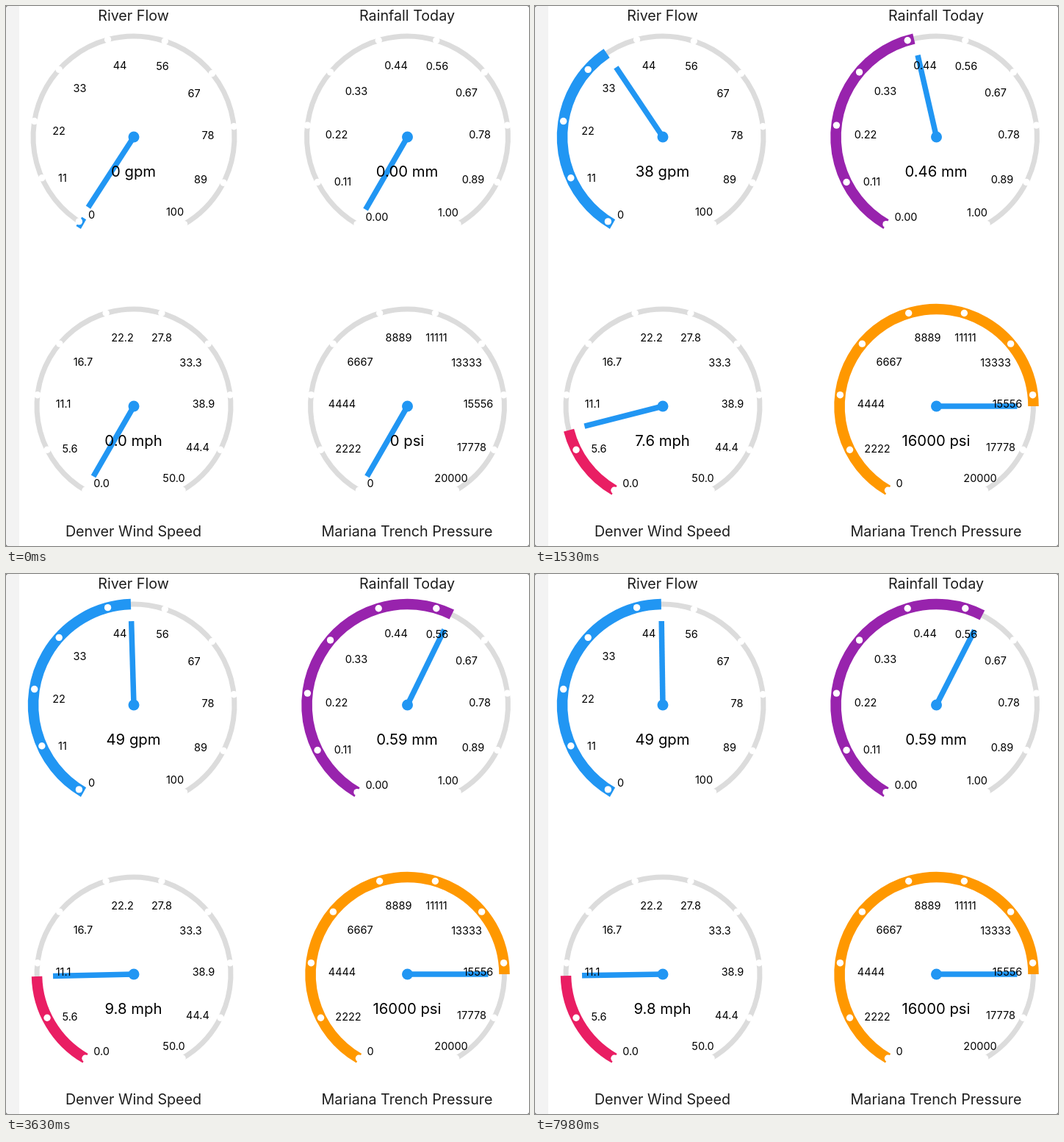
An HTML page with a canvas that plays this animation: 712x734 px, repeating every 8 s.

```html
<!DOCTYPE html>
<html lang="en">
<head>
<meta charset="utf-8">
<title>Gauges</title>
<style>
html, body { margin: 0; width: 100%; height: 100%; overflow: hidden; background: #666; }
canvas { display: block; width: 712px; height: 734px; border-radius: 3px; }
</style>
</head>
<body>
<canvas id="stage"></canvas>
<script>
const W = 712, H = 734, LOOP = 8000;
const BLUE = '#2196f3';
const canvas = document.getElementById('stage');
const ctx = canvas.getContext('2d');
const dpr = window.devicePixelRatio || 1;
canvas.width = W * dpr;
canvas.height = H * dpr;

// Angles run clockwise in degrees from 12 o'clock; "first" is the angle of the first tick.
// "at" holds the centres of the ten tick labels as x, y pairs.
const gauges = [
  { title: 'River Flow', ty: 13, x: 174, y: 178, r: 137, needle: 114, first: -147,
    max: 100, digits: 0, unit: 'gpm', color: BLUE, goal: 0.5, ease: settle,
    at: [116.5,284, 77,234, 72,170, 100.5,112, 155,81, 213,82, 256,119, 275,176, 265,236, 230,280] },
  { title: 'Rainfall Today', ty: 13, x: 546.5, y: 178, r: 137, needle: 114, first: -150,
    max: 1, digits: 2, unit: 'mm', color: '#9823ad', goal: 0.6, ease: settle,
    at: [505,287, 458.5,239, 450,175, 477,116, 531,81, 587,82, 627,118, 645,175, 636,236, 602,281] },
  { title: 'Denver Wind Speed', ty: 714, x: 174, y: 544, r: 132, needle: 110, first: -150,
    max: 50, digits: 1, unit: 'mph', color: '#e91e63', goal: 0.2, ease: settle,
    at: [130,649, 87,602, 78,541, 105,484, 158.5,451, 212,451, 251.5,485, 269,541, 261,600, 228.5,642] },
  { title: 'Mariana Trench Pressure', ty: 714, x: 546.5, y: 544, r: 132, needle: 110, first: -150,
    max: 20000, digits: 0, unit: 'psi', color: '#ff9800', goal: 0.8, ease: snap,
    at: [496,649, 466,602, 457.5,541, 482,484, 534.5,451, 586,451, 627,485, 643,541, 634,600, 606,642] }
];

const START = 390, TURN = 5930;

// Exponential approach to the goal, then the same path backwards.
function settle(t) {
  if (t < START) return 0;
  if (t > TURN) t = 2 * TURN - t;
  return 1 - Math.exp(-(t - 280) * 0.001146) - 0.118 * Math.exp(-(t - START) / 60);
}

function snap(t) {
  const u = Math.min(1, Math.max(0, (t - START) / 480));
  return 1 - (1 - u) ** 2;
}

const rad = deg => (deg - 90) * Math.PI / 180;

function arc(g, to, width, color) {
  ctx.beginPath();
  ctx.arc(g.x, g.y, g.r, rad(-150), rad(to));
  ctx.lineWidth = width;
  ctx.strokeStyle = color;
  ctx.stroke();
}

function disc(x, y, r, color) {
  ctx.beginPath();
  ctx.arc(x, y, r, 0, 2 * Math.PI);
  ctx.fillStyle = color;
  ctx.fill();
}

function text(str, x, y, size, color = '#000') {
  ctx.font = `${size}px Inter, Roboto, sans-serif`;
  ctx.fillStyle = color;
  ctx.fillText(str, x, y + size * 0.36);
}

function drawGauge(g, t) {
  const part = g.goal * g.ease(t);
  const span = 150 - g.first;
  const angle = g.first + span * part;

  arc(g, 150, 7, '#dcdcdc');
  if (angle > -150) arc(g, angle, 14.5, g.color);
  for (let i = 0; i < 10; i++) {
    const a = rad(g.first + span * i / 9);
    disc(g.x + g.r * Math.cos(a), g.y + g.r * Math.sin(a), 4.7, '#fff');
  }

  const a = rad(angle);
  ctx.beginPath();
  ctx.moveTo(g.x, g.y);
  ctx.lineTo(g.x + g.needle * Math.cos(a), g.y + g.needle * Math.sin(a));
  ctx.lineWidth = 7.5;
  ctx.strokeStyle = BLUE;
  ctx.stroke();
  disc(g.x, g.y, 7.5, BLUE);

  for (let i = 0; i < 10; i++)
    text((g.max * i / 9).toFixed(g.digits), g.at[2 * i], g.at[2 * i + 1], 14.5);
  text(`${(g.max * part).toFixed(g.digits)} ${g.unit}`, g.x - 0.5, g.y + 47, 20.3);
  text(g.title, g.x - 0.5, g.ty, 19.7, '#1d1d1d');
}

function draw(now) {
  ctx.setTransform(dpr, 0, 0, dpr, 0, 0);
  ctx.fillStyle = '#fff';
  ctx.fillRect(0, 0, W, H);
  ctx.fillStyle = '#f3f3f3';
  ctx.fillRect(0, 0, 18, H);
  ctx.textAlign = 'center';
  for (const g of gauges) drawGauge(g, now % LOOP);
  requestAnimationFrame(draw);
}
requestAnimationFrame(draw);
</script>
</body>
</html>
```
